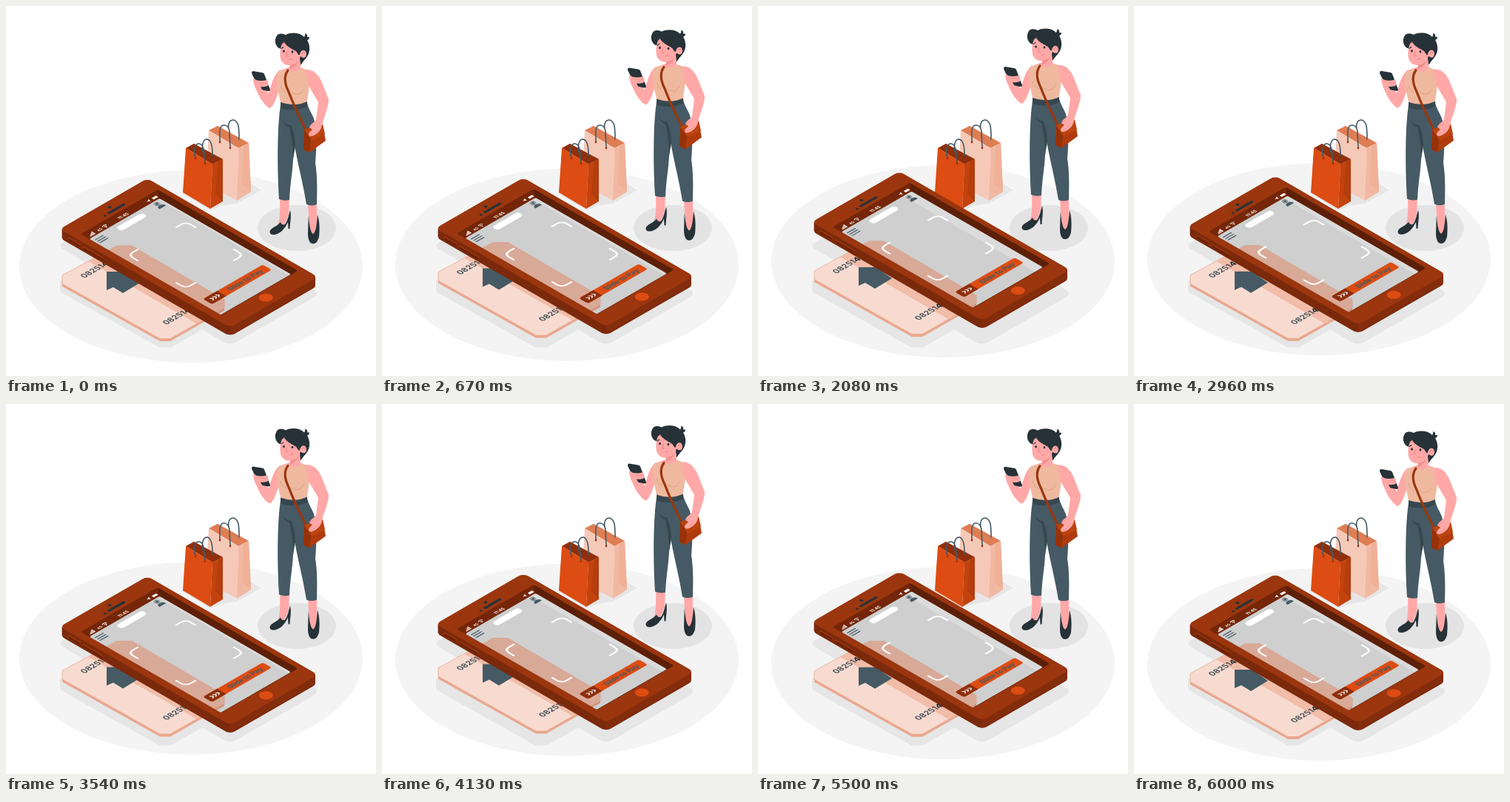
Recreate the animation shown at these times as an HTML page. Size 500 px wide and 500 px high, loop 6040 ms.

```html
<!DOCTYPE html>
<html lang="en">
<head>
<meta charset="utf-8">
<title>Slide to Pay</title>
<style>
  html, body { margin: 0; width: 100%; height: 100%; overflow: hidden; background: #fff; }
  svg { display: block; width: 100%; height: 100%; }
  text { font-family: Inter, "Open Sans", sans-serif; }
  .line { fill: none; stroke-linecap: round; stroke-linejoin: round; }
  .skin { fill: #ffa8a7; }
  .dark { fill: #263238; }
  .slate { fill: #455a64; }
  .shade { fill: #e6e6e6; }
  .bold { font-weight: 800; fill: #263238; }
</style>
</head>
<body>
<svg viewBox="0 0 500 500">
  <defs>
    <!-- phone plane: x runs along the long side, y along the short side -->
    <rect id="slab" x="1.5" y="1.5" width="266" height="136.8" rx="7" transform="matrix(.866 .5 -.866 .5 191 231.5)"/>
    <path id="tag" d="M76 364L150 324H170L295 397V408L222 449.5H208L76 375.5Z"/>
    <path id="bracket" class="line" d="M90 45V38Q90 30 98 30H105" stroke="#fff" stroke-width="2.3"/>
    <mask id="hole" maskUnits="userSpaceOnUse" x="0" y="0" width="500" height="500">
      <rect width="500" height="500" fill="#fff"/>
      <rect x="38" y="19" width="205" height="109.5" rx="2" transform="matrix(.866 .5 -.866 .5 191 231.5)"/>
    </mask>
  </defs>

  <ellipse id="floor" cx="250" cy="352" rx="232" ry="130" fill="#f4f4f4"/>

  <!-- still shadows -->
  <g class="shade">
    <use href="#slab" y="22.5" stroke="#e6e6e6" stroke-width="4"/>
    <use href="#tag" y="9" stroke="#e6e6e6" stroke-width="6" stroke-linejoin="round"/>
    <path d="M238 253L276 276L292 270L311 267L345 249L330 240L250 240Z"/>
    <ellipse cx="393" cy="300" rx="53" ry="31" fill="#e3e3e3"/>
  </g>

  <!-- shopping bags -->
  <g>
    <path d="M274 168L286 162L328 185L314 192Z" fill="#df7d53"/>
    <path d="M274 168L314 192L312 263L270 240Z" fill="#f5c9b8"/>
    <path d="M314 192L328 185L331 251L312 263Z" fill="#f1b9a2"/>
    <path d="M321 189L328 185L331 251L319 240Z" fill="#efb096"/>
    <path d="M243 192L254 186L293 207L279 214Z" fill="#8f2f0b"/>
    <path d="M243 192L279 214L276 274L239 252Z" fill="#dd4c12"/>
    <path d="M279 214L293 207L293 264L276 274Z" fill="#c3430f"/>
    <path d="M286 210L293 207L293 264L283 253Z" fill="#b53d0e"/>
    <g class="line" stroke="#455a64" stroke-width="1.6">
      <path d="M289 184V171C288 159 299 157 302 169L303 192M301 166C298 153 311 149 314 162Q315 167 315 180"/>
      <path d="M256 206C254 199 253 187 260 186C266 186 268 192 269 213M266 198C264 186 267 180 272 180C278 182 279 190 279 203"/>
    </g>
    <g fill="#9b370f">
      <circle cx="289" cy="184" r="1.4"/><circle cx="303" cy="192" r="1.4"/>
      <circle cx="256" cy="206" r="1.4"/><circle cx="269" cy="213" r="1.4"/>
    </g>
  </g>

  <g id="card">
    <path d="M76 364V379L208 453H222L295 411.5V397Z" fill="#e9a78d"/>
    <use href="#tag" fill="#f8dbd0" stroke="#e9a78d" stroke-width=".8"/>
    <path d="M111 345L150 324H170L295 397V408L257 429Z" fill="#f1bca8"/>
    <path class="slate" d="M136 359H178L168 365L181 374L158 388L145 380L136 384Z"/>
    <g font-size="10.7" font-weight="600" fill="#37474f">
      <text transform="matrix(.866 -.5 .866 .5 106 368)">08251<tspan class="bold">456</tspan></text>
      <text transform="matrix(.866 -.5 .866 .5 217 431)">08251<tspan class="bold">456</tspan></text>
    </g>
  </g>

  <g id="phone">
    <g mask="url(#hole)">
      <g fill="#7b290b">
        <use href="#slab" y="12"/>
        <path d="M75.6 301.4L418 366V378L75.6 313.4Z"/>
      </g>
      <path d="M303 432.4L418 366V378L303 444.4Z" fill="#842d0c"/>
      <use href="#slab" fill="#9b360e"/>
      <path class="line" d="M85 315L99 323M105 327L129 341" stroke="#9b360e" stroke-width="4.5"/>
      <path class="line" d="M85 316L99 324M105 328L129 342" stroke="#6b2309" stroke-width="3"/>
      <g transform="matrix(.866 .5 -.866 .5 191 231.5)">
        <rect x="25" y="8.7" width="218.7" height="119.8" rx="3" fill="#5c1f08"/>
        <path d="M25.5 9.5L38 19V128.5H28Q25 128.5 25 125.5Z" fill="#752609"/>
      </g>
    </g>
    <g transform="matrix(.866 .5 -.866 .5 191 231.5)">
      <rect x="38" y="19" width="205" height="109.5" rx="2" opacity=".1"/>
      <g class="dark">
        <rect x="16.5" y="53" width="3.6" height="27" rx="1.8"/>
        <circle cx="11" cy="70" r="2.1"/><circle cx="19" cy="85" r="1.7"/>
      </g>
      <circle cx="255" cy="70" r="7.8" fill="#dd4c12"/>
      <rect x="43.5" y="52" width="9" height="41" rx="4.5" fill="#fff"/>
      <path class="line" d="M44 113V125M47.7 113V125M51.4 113V125" stroke="#455a64" stroke-width="1.4"/>
      <circle class="slate" cx="43.5" cy="28.5" r="1.8"/>
      <circle class="line" cx="43.5" cy="28.5" r="3" stroke="#455a64" stroke-width=".7"/>
      <path class="slate" d="M52.5 23.5V33.5Q47.5 33.5 47.5 28.5T52.5 23.5Z"/>
      <use href="#bracket"/>
      <use href="#bracket" transform="rotate(90 135 75)"/>
      <use href="#bracket" transform="rotate(180 135 75)"/>
      <use href="#bracket" transform="rotate(270 135 75)"/>
      <rect x="208" y="28" width="14" height="93" rx="3" fill="#dd4c12"/>
      <path d="M208 99H222V118Q222 121 219 121H211Q208 121 208 118Z" fill="#8b2e0b"/>
      <path class="line" d="M212.5 115L215 112L217.5 115M212.5 110.5L215 107.5L217.5 110.5M212.5 106L215 103L217.5 106" stroke="#fff" stroke-width="1.2"/>
      <text transform="translate(218.5 89) rotate(-90)" font-size="9.3" font-weight="700" class="slate">Slide to Pay</text>
      <g fill="#fff">
        <path d="M36 124V122.6H34V124ZM36 122V120.6H32.7V122ZM36 120V118.6H31.3V120ZM36 118V116.6H30V118Z"/>
        <text transform="translate(35.5 111.5) rotate(-90)" font-size="5" font-weight="600">4G</text>
        <text transform="translate(35.5 78.5) rotate(-90)" font-size="6" font-weight="700">11:45</text>
        <path d="M30.5 28.5L35.5 30L33.5 31L33 33.5Z"/>
        <rect x="31.5" y="18" width="3.6" height="7" rx="1"/>
        <circle cx="35" cy="99" r=".9"/>
      </g>
      <path class="line" d="M33.4 100.6Q32.4 99 33.4 97.4M31.8 102Q30 99 31.8 96" stroke="#fff" stroke-width=".9"/>
    </g>
  </g>

  <g id="woman">
    <!-- feet -->
    <path class="skin" d="M370 258H383L382 281Q378 296 370 301L368 294Q371 285 370 258Z"/>
    <path class="dark" d="M384 276C386 285 384 290 383.5 301H381.5L381 292C377 301 370 309 361 309C356 309 355 304 359 301C365 297 369 295 371 292Q373 297 377 295C381 290 382 282 384 276Z"/>
    <path class="skin" d="M408 266H420V304Q414 312 410 303Z"/>
    <path class="dark" d="M408.7 284C410 294 411 306 415 308C419 306 420 294 421 282C424 291 424 303 423 312C421 319 418 322 414 321C410 321 408 314 408 308Z"/>

    <!-- trousers -->
    <path class="slate" d="M371 134C367 160 366 210 369 261Q376 264 383 262C384 240 387 226 388 208L390 188C393 208 402 242 406 268Q413 271 420 268C421 240 420 225 418 212C420 190 420 167 416 152C412 143 409 139 407 131Z"/>
    <path d="M371 129Q390 135 407 128V136Q390 144 371 138Z" fill="#37474f"/>
    <path d="M374 155Q378 161 385 161C390 172 391 182 391 190L388 206C388 192 386 175 383 164Q377 162 374 155Z" fill="#37474f"/>

    <!-- near arm -->
    <path class="skin" d="M371 86C363 90 359 104 355 118L348 108L336 103C337 116 349 136 357 138C363 134 367 119 370 110Z"/>

    <!-- neck and top -->
    <path class="skin" d="M384 72L398 66V83L408 87L405 100H372L371 87L384 82Z"/>
    <path d="M371 87Q366 90 366 98C365 108 368 114 371 130Q390 137 407 129C408 118 412 105 409 96Q408 89 404 86L398 84Q389 93 382 85Z" fill="#efb99f"/>
    <path class="line" d="M386 117Q396 124 402 113M371 108Q373 115 378 117" stroke="#dc9c81" stroke-width=".9"/>

    <!-- shoulder bag -->
    <path class="line" d="M381 87C375 95 377 106 382 116C388 132 398 153 405 167" stroke="#9b370f" stroke-width="3.2"/>
    <path d="M403 167L428 160L432 182L410 198L402 194Z" fill="#b03c0e"/>
    <path d="M403 167L413 176L410 198L402 194Z" fill="#963209"/>
    <path d="M403 167L428 160L431 173L413 182Z" fill="#bd4310"/>

    <!-- far arm -->
    <path class="skin" d="M404 86C415 85 421 91 426 101L436 126C437 133 430 149 427 161C426 169 418 176 411 176C407 174 410 170 414 167L410 164C412 158 418 157 419 153C420 145 421 138 422 130L409 108Z"/>
    <path class="line" d="M411 174Q418 173 421 167M410 164L417 160" stroke="#f28f8f" stroke-width=".8"/>

    <!-- hand and handset -->
    <path class="dark" d="M334 88L346 90Q348 90 349 92L357 113Q357 115 354 115L345 113Q342 112 341 110L332 91Q332 88 334 88Z"/>
    <path class="skin" d="M334 99Q335 97 338 100Q344 102 352 100Q355 101 354 104L355 107Q351 110 344 109L347 115L342 118Q335 111 334 99Z"/>
    <path class="line" d="M343 104H353" stroke="#f28f8f" stroke-width=".8"/>

    <!-- head -->
    <path class="dark" d="M372 58C365 57 362 48 365 42C367 36 374 37 378 39C386 35 397 36 403 42Q405 39 404 37Q408 38 407 42L410 42Q410 45 407 46C412 55 411 64 405 71Q402 74 398 80L396 65Z"/>
    <path class="skin" d="M373 51C370 58 370 66 371 71C373 78 379 81 385 80C391 79 396 74 398 68Q405 73 406 65C406 58 398 58 397 66L394 65C394 61 390 58 386 56Q378 53 376 48Z"/>
    <path class="dark" d="M373 52Q377 45 384 48C391 50 397 57 397 66H395C394 61 388 59 383 56Q378 53 376 49Z"/>
    <path class="skin" d="M384 79Q393 78 397 70L398 83Q389 88 384 82Z"/>
    <path d="M384 80Q391 79 395 74Q392 83 384 85Z" fill="#f28f8f"/>
    <g class="dark">
      <ellipse cx="375.5" cy="61" rx="1.4" ry="1.7"/><ellipse cx="387" cy="62" rx="1.4" ry="1.7"/>
    </g>
    <path class="line" d="M372 57.5L375 55.5M385.5 57Q388 57 390 59" stroke="#263238" stroke-width="1.1"/>
    <path class="line" d="M380 62L378.5 67.5L381 68M383 72.5Q385 71 387 71.5M400 64Q403 61 404 64" stroke="#ed7f80" stroke-width="1"/>
  </g>
</svg>
<script>
const LOOP = 6040, FPS = 24, RISE = 10;
const parts = ["floor", "card", "phone", "woman"].map(id => document.getElementById(id));
const [floor, card, phone, woman] = parts;

// Linear rise and fall, in px above the resting place
function float(time, period) {
  if (time <= 0) return 0;
  const p = (time / period) % 1;
  return RISE * (1 - Math.abs(1 - 2 * p));
}

function lift(part, height) {
  part.setAttribute("transform", `translate(0 ${-height})`);
}

function draw() {
  const ms = performance.now() % LOOP;
  const s = Math.floor((ms + 5) * FPS / 1000) / FPS;
  lift(floor, float(s, 6));
  lift(card, float(s, 3));
  lift(woman, float(s, 3));
  lift(phone, float(s - .5, 3));
  requestAnimationFrame(draw);
}
draw();
</script>
</body>
</html>
```
